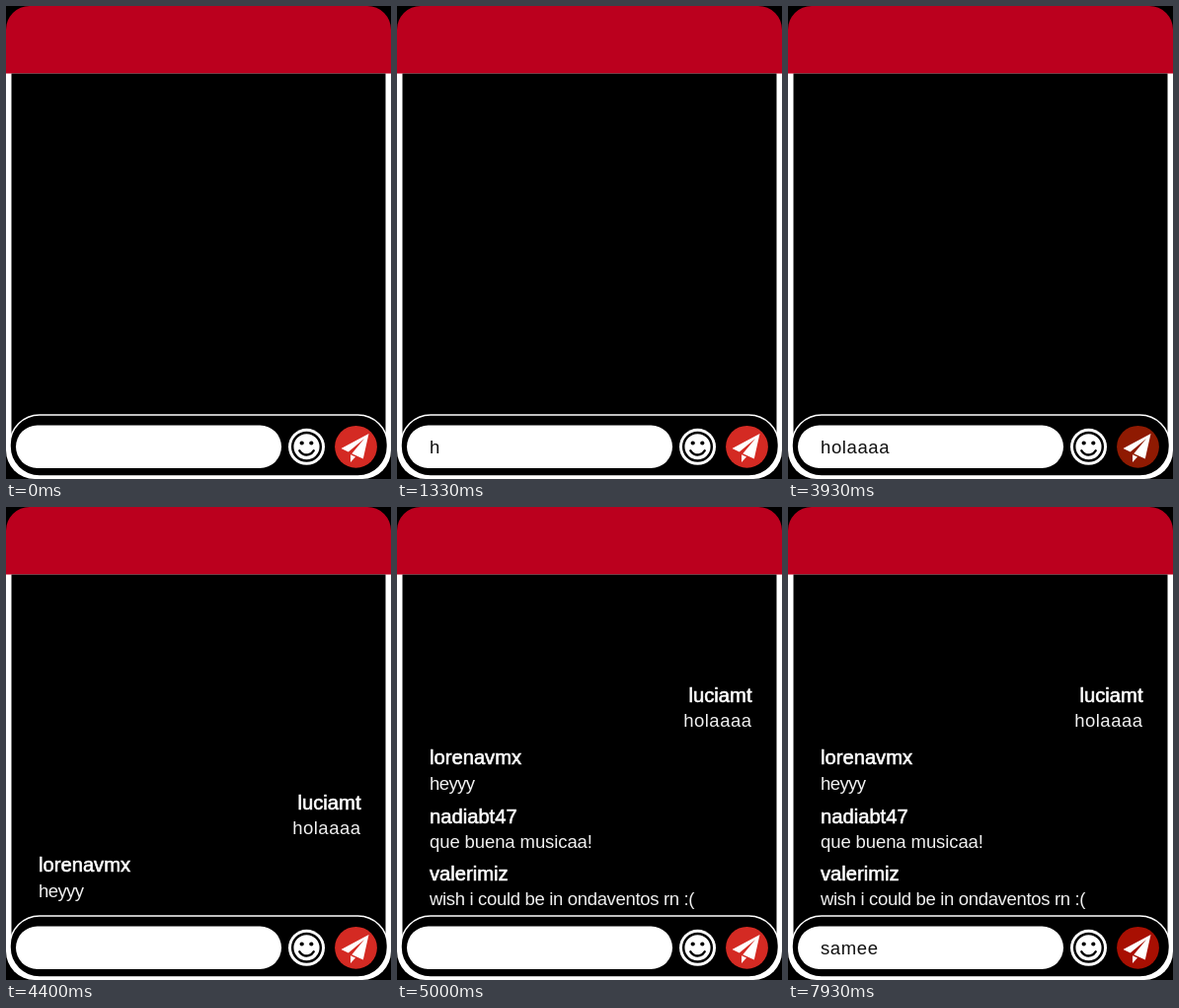
An HTML page with a canvas for the animation above (8 s loop, 390 px wide and 480 px high).

```html
<!DOCTYPE html>
<html lang="es">
<head>
<meta charset="utf-8">
<title>Chat</title>
<style>
  html, body { margin: 0; width: 100%; height: 100%; overflow: hidden; background: #000; }
  canvas { display: block; width: 390px; height: 480px; }
</style>
</head>
<body>
<canvas id="stage"></canvas>
<script>
const W = 390, H = 480, LOOP = 8000;
const FONT = '"Liberation Sans", Arial, sans-serif';
const RED = '#d42a23';
const canvas = document.getElementById('stage');
const ctx = canvas.getContext('2d');
const dpr = window.devicePixelRatio || 1;
canvas.width = W * dpr;
canvas.height = H * dpr;

// y is the baseline of the user name once the list is complete
const chat = [
  { at: 4000, y: 197.5, name: 'luciamt', text: 'holaaaa', gap: 0.5, right: true },
  { at: 4330, y: 261, name: 'lorenavmx', text: 'heyyy', gap: -0.6 },
  { at: 4670, y: 320.5, name: 'nadiabt47', text: 'que buena musicaa!', gap: -0.1 },
  { at: 5000, y: 378.5, name: 'valerimiz', text: 'wish i could be in ondaventos rn :(', gap: -0.33 }
];
const shifts = [163, 109, 55, 0];

const typing = [
  { word: 'holaaaa', keys: [1330, 1730, 2000, 2330, 2670, 3000, 3400], sent: 4000 },
  { word: 'samee', keys: [6000, 6330, 6730, 7000, 7330], sent: LOOP }
];
const carets = [[330, 630], [1000, 1330], [5330, 5670]];
const presses = [
  { from: 3670, to: 4000, mid: '#b22212', dark: '#8f1a02' },
  { from: 7670, to: LOOP, mid: '#c01c14', dark: '#a80f02' }
];

const within = (t, a, b) => t >= a && t < b;

function box(x, y, w, h, r, fill) {
  ctx.beginPath();
  ctx.roundRect(x, y, w, h, r);
  ctx.fillStyle = fill;
  ctx.fill();
}

function disc(x, y, r, fill) {
  ctx.beginPath();
  ctx.arc(x, y, r, 0, Math.PI * 2);
  ctx.fillStyle = fill;
  ctx.fill();
}

function shape(points) {
  ctx.beginPath();
  points.forEach(([x, y]) => ctx.lineTo(x, y));
  ctx.closePath();
  ctx.fill();
}

function label(text, x, y, size, gap, color, align = 'left') {
  ctx.font = size + 'px ' + FONT;
  ctx.letterSpacing = gap + 'px';
  ctx.textAlign = align;
  ctx.fillStyle = color;
  ctx.fillText(text, x, y);
}

function drawFrame() {
  ctx.fillStyle = '#000';
  ctx.fillRect(0, 0, W, H);
  box(0, 60, W, 420, [0, 0, 29, 29], '#fff');
  box(0, 0, W, 68.5, [24, 24, 0, 0], '#bb001e');
  ctx.fillStyle = '#000';
  ctx.fillRect(5.5, 68.5, 379, 371.5);
}

function drawChat(t) {
  const shown = chat.filter(m => t >= m.at);
  const shift = shifts[shown.length - 1];
  for (const m of shown) {
    const x = m.right ? 359.5 : 33;
    const align = m.right ? 'right' : 'left';
    const y = m.y + shift;
    label(m.name, x, y, 20.2, 0, '#fff', align);
    ctx.strokeStyle = '#fff';
    ctx.lineWidth = 0.6;
    ctx.strokeText(m.name, x, y);
    label(m.text, x, y + 25.5, 18.5, m.gap, '#f0f0f0', align);
  }
}

function drawSmiley(x, y) {
  disc(x, y, 18.5, '#fff');
  ctx.strokeStyle = '#000';
  ctx.lineWidth = 2.5;
  ctx.lineCap = 'round';
  ctx.beginPath();
  ctx.arc(x, y, 14.3, 0, Math.PI * 2);
  ctx.stroke();
  disc(x - 4.8, y - 3.8, 2.1, '#000');
  disc(x + 4.8, y - 3.8, 2.1, '#000');
  ctx.strokeStyle = '#000';
  ctx.beginPath();
  ctx.arc(x, y, 8.2, 0.16 * Math.PI, 0.84 * Math.PI);
  ctx.stroke();
}

function drawSend(t) {
  const p = presses.find(p => within(t, p.from, p.to));
  const fill = !p ? RED : t < p.from + 60 ? p.mid : p.dark;
  disc(354.5, 447.3, 21.4, fill);
  ctx.fillStyle = '#fff';
  shape([[367.5, 434], [339.5, 449], [346.8, 452.5], [363, 439], [350.3, 454.3], [361.8, 459.5]]);
  shape([[349, 455.2], [349, 463], [354, 457.5]]);
}

function drawBar(t) {
  box(4, 415, 382.5, 62, 30, '#000');
  ctx.strokeStyle = '#fff';
  ctx.lineWidth = 1.6;
  ctx.stroke();
  box(10, 425.5, 269, 43.5, 21.75, '#fff');

  for (const { word, keys, sent } of typing) {
    if (t >= sent) continue;
    const count = keys.filter(k => t >= k).length;
    if (count) label(word.slice(0, count), 33, 454.3, 18.5, 0.6, '#111');
  }
  if (carets.some(([a, b]) => within(t, a, b))) {
    ctx.fillStyle = '#111';
    ctx.fillRect(34.5, 439, 1.7, 18);
  }
  drawSmiley(304.5, 447.3);
  drawSend(t);
}

function draw(now) {
  const t = now % LOOP;
  ctx.setTransform(dpr, 0, 0, dpr, 0, 0);
  drawFrame();
  drawChat(t);
  drawBar(t);
}

const start = performance.now();
function tick() {
  draw(performance.now() - start);
  requestAnimationFrame(tick);
}
tick();
</script>
</body>
</html>
```
